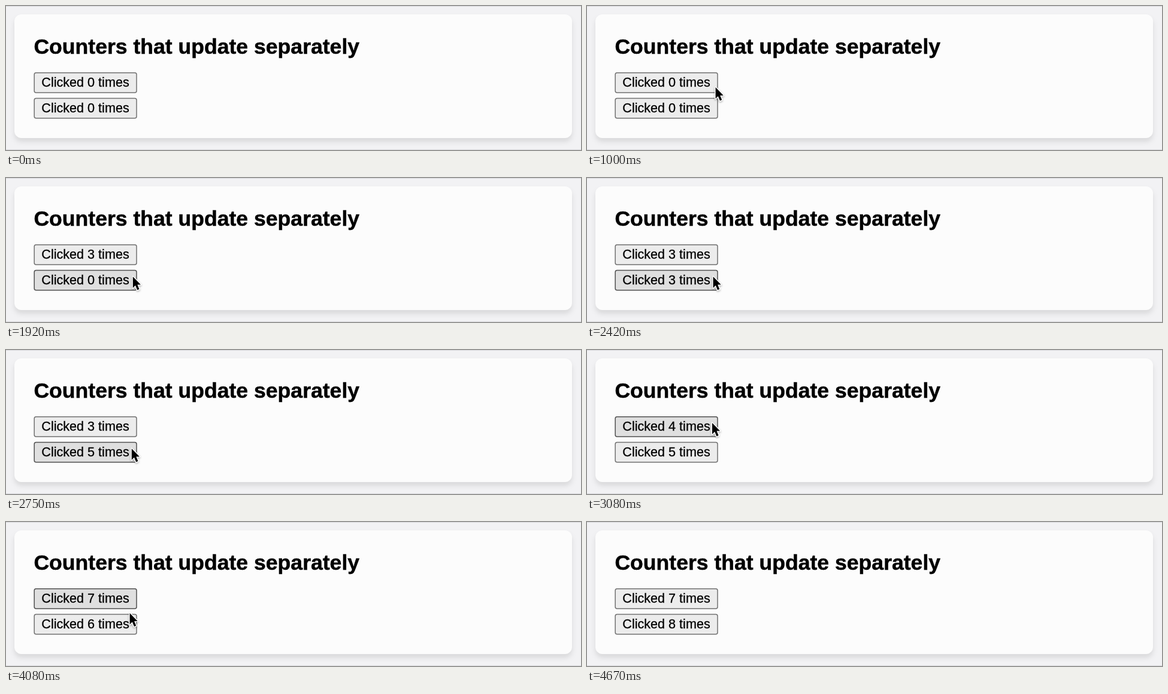
Recreate the animation shown at these times as an HTML page. Size 960 by 241 pixels, loop 5830 ms.

```html
<!DOCTYPE html>
<html lang="en">
<head>
<meta charset="utf-8">
<title>Counters that update separately</title>
<style>
  html, body { margin: 0; width: 100%; height: 100%; overflow: hidden; background: #f2f2f4; }
  svg { display: block; width: 960px; height: 241px; font-family: "Liberation Sans", Arial, sans-serif; }
  text { stroke: #000; stroke-width: .3; }
  .card { fill: #fcfcfc; filter: drop-shadow(0 6px 4.5px rgba(0, 0, 0, .1)); }
  .rule { fill: #d9d9dc; }
  .title { font-size: 35.6px; font-weight: bold; stroke-width: .5; }
  .button rect { fill: #ececec; stroke: #707070; stroke-width: 1.5; }
  .button.hover rect { fill: #dfdfdf; stroke: #4f4f4f; }
  .button.active rect { fill: #f4f4f4; stroke: #8d8d8d; }
  .button text { font-size: 21.6px; text-anchor: middle; }
  #cursor { stroke: #fff; stroke-width: 2.2; stroke-linejoin: round; paint-order: stroke;
    filter: drop-shadow(0 1px 1px rgba(0, 0, 0, .3)); }
</style>
</head>
<body>
<svg viewBox="0 0 960 241">
  <rect class="rule" width="960" height="1"/>
  <rect class="rule" y="240" width="960" height="1"/>
  <rect class="card" x="14" y="14" width="931" height="207" rx="12"/>
  <text class="title" x="46.4" y="80">Counters that update separately</text>
  <g class="button">
    <rect x="47.2" y="111.7" width="170.8" height="33.2" rx="3"/>
    <text x="132.5" y="135.3"></text>
  </g>
  <g class="button" transform="translate(0 42.8)">
    <rect x="47.2" y="111.7" width="170.8" height="33.2" rx="3"/>
    <text x="132.5" y="135.3"></text>
  </g>
  <path id="cursor" d="M0 0V13.5L3 10.6 5.3 16 7.6 15 5.4 9.7H9.4Z"/>
</svg>
<script>
const LOOP = 5830, STEPS_PER_SECOND = 12;
const CURSOR_IN = 8, CURSOR_SETTLED = 14, CURSOR_OUT = 56;

// The pointer hovers a button from `start`; each click is one step down, one step up.
const visits = [
  { button: 0, start: 16, clicks: 3, y: 134 },
  { button: 1, start: 23, clicks: 5, y: 165 },
  { button: 0, start: 35, clicks: 2, y: 122 },
  { button: 1, start: 40, clicks: 1, y: 178 },
  { button: 0, start: 43, clicks: 2, y: 127 },
  { button: 1, start: 50, clicks: 2, y: 178 }
];

const buttons = [...document.querySelectorAll(".button")];
const cursor = document.getElementById("cursor");
const clamp = (v, min, max) => Math.min(max, Math.max(min, v));
const progress = (step, from, to) => clamp((step - from) / (to - from), 0, 1);

function clicksDone(visit, step) {
  return clamp(Math.floor((step - visit.start) / 2), 0, visit.clicks);
}

function pointerAt(step) {
  const away = (1 - progress(step, CURSOR_IN, CURSOR_SETTLED)) ** 3;
  const drift = 0.2 * Math.max(0, step - visits[1].start);
  let y = visits[0].y;
  for (const { start, y: target } of visits.slice(1)) {
    y += (target - y) * progress(step, start - 2, start);
  }
  return [211.8 - drift + 76 * away, y + 57 * away];
}

function draw(time) {
  const step = Math.floor((time % LOOP + 5) * STEPS_PER_SECOND / 1000);
  const visible = step >= CURSOR_IN && step < CURSOR_OUT;
  const current = visible && visits.findLast(visit => step >= visit.start);
  const pressed = current && (step - current.start) % 2 === 1
    && clicksDone(current, step) < current.clicks;

  buttons.forEach((button, i) => {
    const count = visits.filter(visit => visit.button === i)
      .reduce((sum, visit) => sum + clicksDone(visit, step), 0);
    const hovered = Boolean(current) && current.button === i;
    button.querySelector("text").textContent = `Clicked ${count} times`;
    button.classList.toggle("hover", hovered);
    button.classList.toggle("active", hovered && pressed);
  });

  cursor.style.display = visible ? "" : "none";
  cursor.setAttribute("transform", `translate(${pointerAt(step)}) scale(1.4)`);
}

const start = performance.now();
function tick() {
  draw(performance.now() - start);
  requestAnimationFrame(tick);
}
tick();
</script>
</body>
</html>
```
